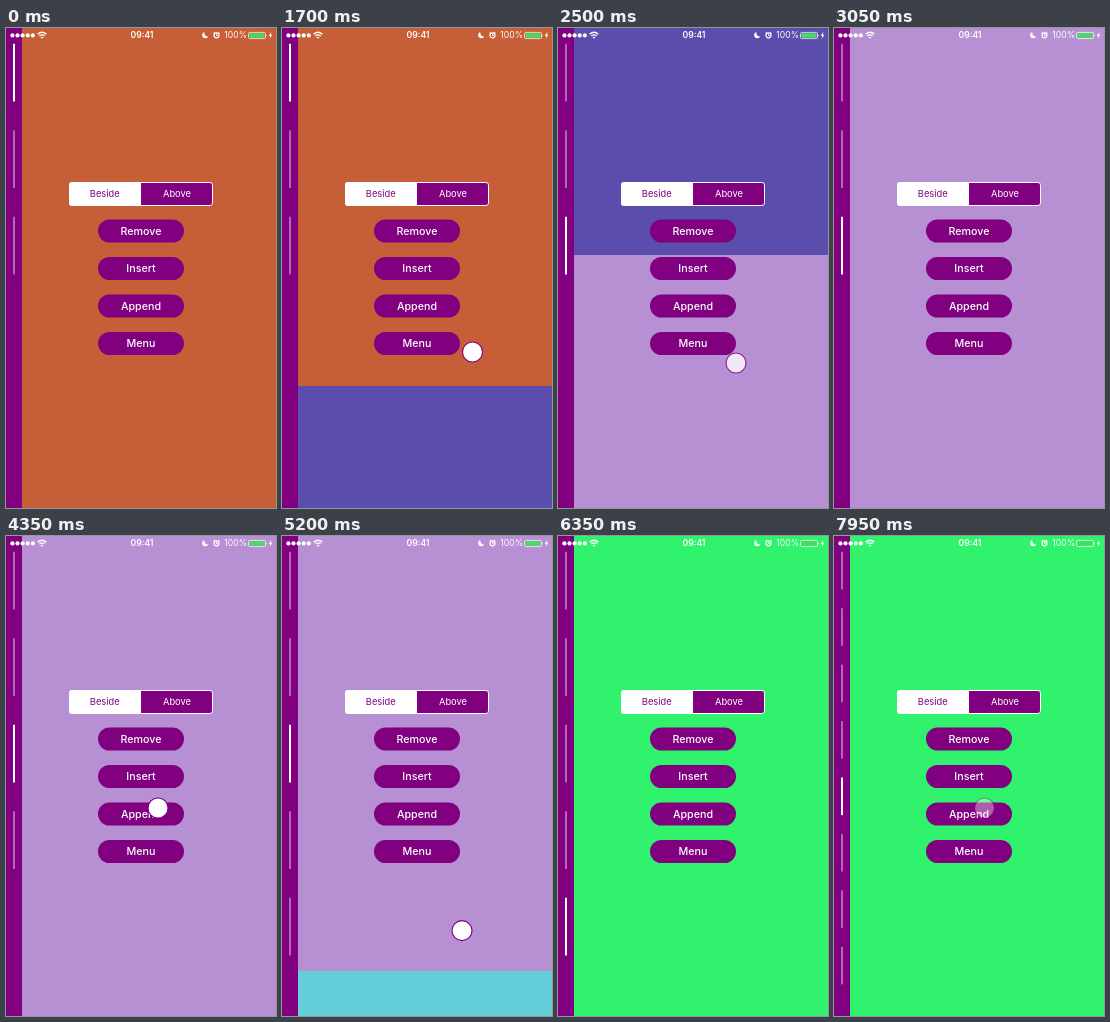
Write an HTML page that moves like this. It is 270 by 480 pixels and loops after 8 s.

```html
<!DOCTYPE html>
<html lang="en">
<head>
<meta charset="utf-8">
<title>Page menu</title>
<style>
  html, body { margin: 0; width: 100%; height: 100%; overflow: hidden; }
  svg { display: block; width: 100vw; height: 100vh; }
  text { font-family: Inter, Roboto, sans-serif; fill: #fff; text-anchor: middle; }
  .label { font-size: 10.7px; font-weight: 500; }
  .segment { font-size: 9.3px; }
  .status { font-size: 8.6px; }
</style>
</head>
<body>
<svg viewBox="0 0 270 480" preserveAspectRatio="none">
  <g id="pages"></g>
  <rect width="16" height="480" fill="#800080"/>
  <g id="bars" fill="#fff"></g>

  <g id="status" fill="#fff">
    <g id="signal"></g>
    <g fill="none" stroke="#fff" stroke-width="1.3">
      <path d="M31.6 6.2Q36 2.4 40.4 6.2M33.3 8Q36 5.7 38.7 8"/>
    </g>
    <path d="M34.5 9.3Q36 8 37.5 9.3L36 10.8Z"/>
    <text class="status" x="136" y="10.4" font-weight="600">09:41</text>
    <path d="M198.4 4A3.2 3.2 0 1 0 202.2 8.4A3.5 3.5 0 0 1 198.4 4Z"/>
    <circle cx="210.5" cy="7.3" r="2.5" fill="none" stroke="#fff" stroke-width="1.2"/>
    <path d="M210.5 5.8V7.5H211.8M207.4 5.2L209 3.9M213.6 5.2L212 3.9" fill="none" stroke="#fff" stroke-width=".9"/>
    <text class="status" x="229.7" y="10.4">100%</text>
    <rect x="242.5" y="4.4" width="17" height="6.2" rx="1.2" fill="none" stroke="#fff" stroke-width=".7"/>
    <rect x="243.4" y="5.2" width="15.2" height="4.6" rx=".6" fill="#48db63"/>
    <path d="M260.3 6.3Q261.6 7.5 260.3 8.7Z"/>
    <path d="M265.4 3.8L262.7 7.8H264.4L263.5 11L266.4 6.8H264.7Z"/>
  </g>

  <rect x="63.5" y="154.5" width="143" height="23" rx="2.6" fill="#800080" stroke="#fff"/>
  <path d="M135 154H66Q63 154 63 157V175Q63 178 66 178H135Z" fill="#fff"/>
  <text class="segment" x="98.7" y="169.3" style="fill:#800080">Beside</text>
  <text class="segment" x="171" y="169.3">Above</text>
  <g id="buttons"></g>
  <circle id="touch" r="10" fill="#fff" stroke="#800080" stroke-width="1.1"/>
</svg>
<script>
const LOOP = 8000, HEIGHT = 480, FADE = 200, SETTLE = 75;
const COLORS = ['#c65f38', '#5a4dac', '#b78fd3', '#65cfd9', '#30f26c'];
const MAX_BARS = 8;

// down / up are times; drag is the distance scrolled by the finger
const swipes = [
  { down: 1400, up: 1700, x: 190.5, y: 441, drag: 117 },
  { down: 2350, up: 2460, x: 178, y: 422, drag: 87 },
  { down: 5100, up: 5250, x: 180, y: 440, drag: 100 },
  { down: 5790, up: 5910, x: 180.5, y: 381, drag: 100 }
];
const taps = [3900, 4350, 6800, 7300, 7750].map(down => (
  { down, up: down + 75, x: down < 7000 ? 152 : 150.5, y: 272, drag: 0 }
));
const touches = [...swipes, ...taps];

const byId = id => document.getElementById(id);
function add(parent, tag, attrs, content) {
  const el = document.createElementNS('http://www.w3.org/2000/svg', tag);
  for (const key in attrs) el.setAttribute(key, attrs[key]);
  if (content) el.textContent = content;
  return byId(parent).appendChild(el);
}

for (let i = 0; i < 5; i++) add('signal', 'circle', { cx: 6.4 + i * 5.1, cy: 7.4, r: 2.1 });

['Remove', 'Insert', 'Append', 'Menu'].forEach((name, i) => {
  const y = 203 + i * 37.5;
  add('buttons', 'rect', { x: 92, y: y - 11.5, width: 86, height: 23, rx: 11.5, fill: '#800080' });
  add('buttons', 'text', { class: 'label', x: 135, y: y + 3.9 }, name);
});

const pages = COLORS.map(fill => add('pages', 'rect', { x: 16, width: 254, height: HEIGHT, fill }));
const bars = Array.from({ length: MAX_BARS }, () => add('bars', 'rect', { x: 7, width: 2 }));
const touch = byId('touch');

function dragged(s, t) {
  const p = Math.min(1, Math.max(0, (t - s.down) / (s.up - s.down)));
  return s.drag * p * p;
}

function scrolled(s, t) {
  if (t < s.up) return dragged(s, t);
  const left = (HEIGHT - s.drag) * Math.exp((s.up - t) / SETTLE);
  return left < 2 ? HEIGHT : HEIGHT - left;
}

function render(t) {
  const offset = Math.round(swipes.reduce((sum, s) => sum + scrolled(s, t), 0));
  pages.forEach((page, i) => page.setAttribute('y', i * HEIGHT - offset));

  const count = 3 + taps.filter(tap => t >= tap.up).length;
  const pitch = Math.min(86.5, 451.4 / count);
  const active = Math.round(offset / HEIGHT);
  bars.forEach((bar, i) => {
    bar.setAttribute('y', 15.8 + i * pitch);
    bar.setAttribute('height', pitch * 2 / 3);
    bar.setAttribute('opacity', i >= count ? 0 : i === active ? 1 : 0.4);
  });

  const now = touches.find(s => t >= s.down && t < s.up + FADE);
  touch.setAttribute('opacity', now ? Math.min(1, 1 - (t - now.up) / FADE) : 0);
  if (now) {
    touch.setAttribute('cx', now.x);
    touch.setAttribute('cy', now.y - dragged(now, t));
  }
}

const start = performance.now();
function tick() {
  render((performance.now() - start) % LOOP);
  requestAnimationFrame(tick);
}
tick();
</script>
</body>
</html>
```
